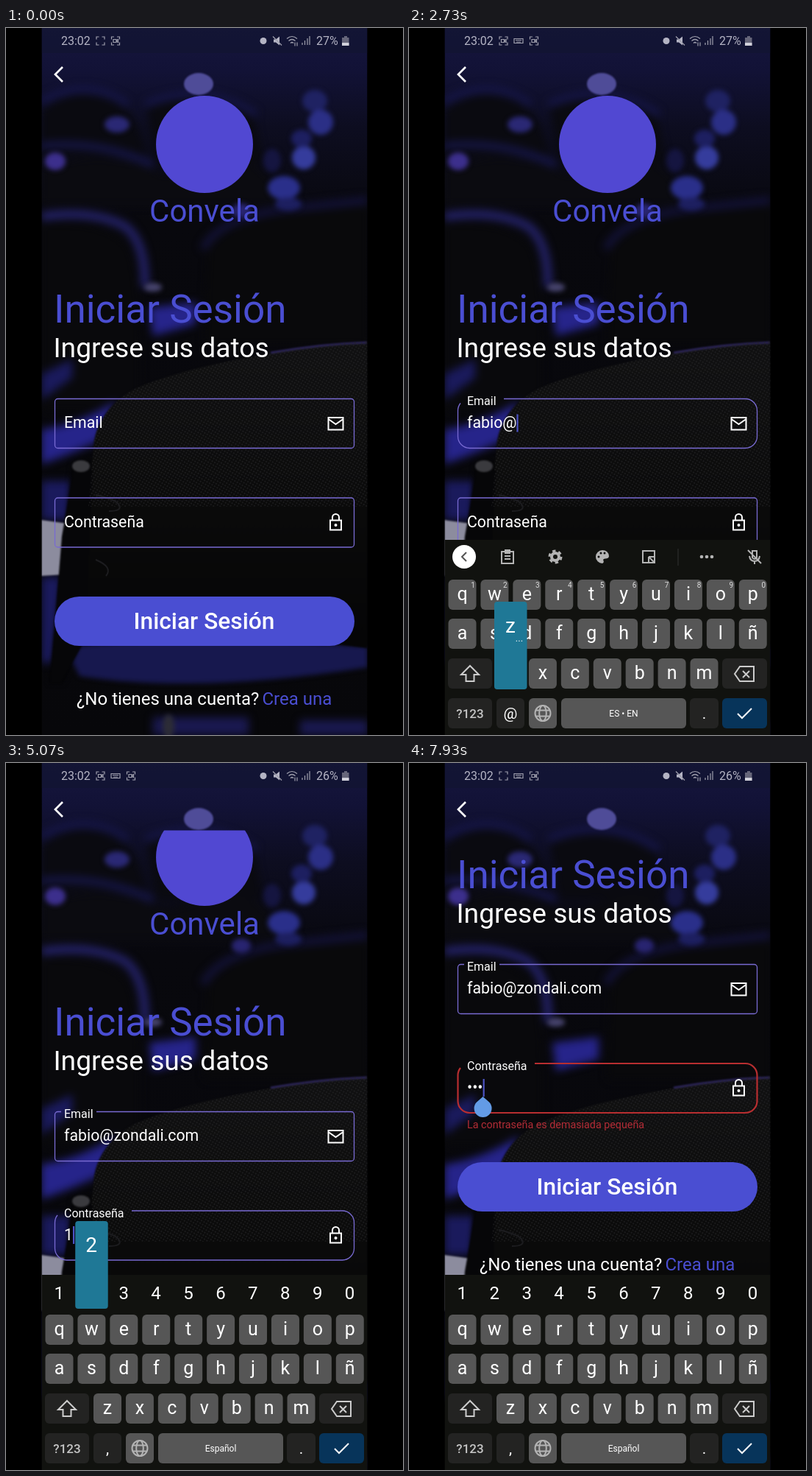
An HTML page for the animation above (8 s loop, 540 by 960 pixels).

```html
<!DOCTYPE html>
<html lang="es">
<head>
<meta charset="utf-8">
<style>
html, body { margin: 0; height: 100%; overflow: hidden; background: #000 }
svg { display: block; width: 540px; height: 960px; font-family: Roboto, sans-serif }
.mid { text-anchor: middle }
.line { fill: none; stroke: #fff; stroke-width: 2 }
.tool { fill: none; stroke: #b4b4b4; stroke-width: 2 }
.status { fill: none; stroke: #a0a0ae; stroke-width: 1.2 }
filter { color-interpolation-filters: sRGB }
</style>
</head>
<body>
<svg id="stage" viewBox="0 0 540 960"></svg>
<script>
const LOOP = 8000, BLUE = '#4a4ed2', MAIL = 'fabio@zondali.com', PASS = '123456';
const mailTimes = [1400, 1520, 1640, 2130, 2440, 2620, 2800, 2940, 3080, 3220, 3390, 3520, 3640, 3780, 3900, 4020, 4140];
const passTimes = [4950, 5120, 5300, 5480, 5660, 5830];
const deleteTimes = [7400, 7560, 7720];
const presses = [
  ...mailTimes.map((t, i) => [t, MAIL[i]]),
  ...passTimes.map((t, i) => [t, PASS[i]]),
  ...deleteTimes.map(t => [t, 'del'])
];
const FOCUS = 620, MAIL_KEYS = 1250, SWITCH = 4500;

const text = (x, y, size, str, attrs = 'fill="#fff"') => `<text x="${x}" y="${y}" font-size="${size}" ${attrs}>${str}</text>`;
const blob = (x, y, rx, ry, fill) => `<ellipse cx="${x}" cy="${y}" rx="${rx}" ry="${ry}" fill="${fill}"/>`;
const path = (d, attrs) => `<path d="${d}" ${attrs}/>`;
const at = (x, y, body, attrs = '') => `<g transform="translate(${x} ${y})" ${attrs}>${body}</g>`;

// Dim cinema seats
const backdrop = `
<rect x="48.5" width="443" height="960" fill="url(#room)"/>
<g filter="url(#soft6)">
  ${path('M48 112Q90 78 140 96Q180 110 190 175H48Z M190 100Q270 70 335 112L350 185H205Z', 'fill="#0a0a10"')}
  ${path('M48 100Q110 66 165 104M190 104Q270 72 340 118M48 160Q130 152 200 186', 'fill="none" stroke="#16164a" stroke-width="9"')}
  ${path('M48 190Q140 160 215 200L300 178Q360 180 372 240H48Z', 'fill="#0b0b10"')}
  ${path('M48 256Q120 246 163 270Q190 292 189 352', 'fill="none" stroke="#25236c" stroke-width="11"')}
  ${path('M48 266Q130 260 163 293Q180 320 182 420V520H48Z', 'fill="#09090c"')}
  ${path('M268 300Q290 258 380 246L492 234', 'fill="none" stroke="#131238" stroke-width="10"')}
  ${path('M275 305Q300 262 390 252L492 242V430H270Z', 'fill="#09090b"')}
  ${path('M48 545Q100 538 150 506L128 560Q80 582 48 592Z M195 380L258 372V402L200 418Z', 'fill="#26248a"')}
  ${path('M48 470L90 450V475L48 505Z M48 615H90V668H48Z M48 745H78V862H48Z', 'fill="#1a1a5c"')}
  ${path('M200 936H330V960H200Z M400 940H492V960H400Z', 'fill="#1a1950"')}
</g>
<g filter="url(#soft3)">
  ${blob(151, 131, 17, 11, '#2a2874')}${blob(67, 181, 14, 12, '#3c2f8c')}
  ${blob(420, 99, 17, 15, '#1f2262')}${blob(428, 128, 17, 17, '#2b2f86')}${blob(405, 176, 16, 16, '#353c9c')}
  ${blob(362, 180, 12, 16, '#151540')}${blob(378, 217, 22, 16, '#2a2f8a')}${blob(384, 239, 18, 9, '#1d1f60')}
  ${blob(320, 248, 13, 10, '#282470')}${blob(402, 150, 14, 12, '#1d1f60')}${blob(200, 352, 12, 6, '#46436c')}
  ${path('M80 840Q280 822 492 840V868Q260 905 100 880Z', 'fill="#17184e"')}
  ${path('M90 590L120 585L116 800L78 890H58Z', 'fill="#050507"')}
  ${blob(221, 948, 8, 16, '#2c2c36')}
</g>
<g filter="url(#soft1)">
  ${blob(262, 76, 20, 15, '#4f4c98')}
  ${path('M48 668L92 674L80 742L48 744Z', 'fill="#8c8c9e"')}
  ${path('M492 426Q430 428 330 447T175 490Q128 516 120 560L106 690V838Q300 815 492 842Z', 'fill="url(#cloth)"')}
  ${path('M491 427Q430 429 360 441', 'fill="none" stroke="#2c2558" stroke-width="3"')}
  ${path('M76 690L92 600H118L108 830L74 890H60Z', 'fill="#060608"')}
  ${blob(102, 595, 12, 8, '#3a3a3e')}
</g>
${path('M492 426Q430 428 330 447T175 490Q128 516 120 560L112 650H492Z', 'fill="url(#weave)"')}
${path('M122 634Q150 640 154 648T140 656M122 722Q146 732 136 744', 'fill="none" stroke="#1c1c1f" stroke-width="2"')}
<rect x="48.5" width="443" height="34" fill="#12152f" opacity=".6"/>`;

const corners = path('M-5.5-2V-5.5H-2M2-5.5H5.5V-2M5.5 2V5.5H2M-2 5.5H-5.5V2', 'class="status"');
const camera = path('M-3-2H1V2H-3ZM1 0L3.5-2V2Z', 'class="status"');
const statusBar = `
${text(75, 23, 16, '23:02', 'fill="#b4b4c4"')}
${at(128.5, 17.5, corners + `<g id="rec">${camera}</g>`)}
${at(149, 17.5, path('M-6-3H6V3H-6ZM-4-1H4M-3 1.5H3', 'class="status"'), 'id="kbIcon"')}
<g id="cam">${corners}${camera}</g>
${blob(350, 17.5, 4.5, 4.5, '#b4b4c4')}
${at(369, 17.5, path('M-5-2H-2L3-6V6L-2 2H-5Z', 'fill="#b4b4c4"') + path('M-6-6L6 6', 'class="status"'))}
${at(389, 17.5, path('M-7-3Q0-9 7-3M-4.5 0Q0-4 4.5 0M-2 3Q0 1 2 3M4 2V7M7 7V2', 'class="status"'))}
${path('M403 23V20M406.5 23V17M410 23V14M413 23V11', 'class="status"')}
<text id="battery" x="422" y="23" font-size="16" fill="#b4b4c4"></text>
<path d="M457 13H460V11H464V13H466.5V24H457Z" fill="#66667a"/><path d="M457 20H466.5V24H457Z" fill="#d0d0da"/>
${path('M77 53L67 63L77 73', 'class="line" style="stroke-width:2.7"')}`;

const field = (id, y, label, icon) => at(0, y, `
  <path id="${id}Box" fill="none"/>
  <text id="${id}Label" font-size="21.3" fill="#fff">${label}</text>
  <text id="${id}Text" x="79" y="39.5" font-size="21.3" fill="#fff"></text>
  <rect id="${id}Caret" y="21" width="2.2" height="24" fill="#4c53c4"/>
  <path id="${id}Under" stroke="#fff" stroke-width="1.3"/>
  ${icon}`);

const form = `<g clip-path="url(#view)"><g id="scroll">
  <circle cx="270" cy="158" r="66" fill="#5148d2"/>
  ${text(270, 263, 42, 'Convela', `class="mid" fill="${BLUE}"`)}
  ${text(65, 399.5, 53, 'Iniciar Sesión', `fill="${BLUE}"`)}
  ${text(64.5, 447, 37.2, 'Ingrese sus datos')}
  ${field('mail', 503.5, 'Email', path('M438.5 25.5H458.5V42H438.5ZM438.5 27.5L448.5 34.5L458.5 27.5', 'class="line"'))}
  ${field('pass', 638, 'Contraseña',
    path('M441 30.5H456V43.5H441ZM444 30V26.5A4.5 4.5 0 0 1 453 26.5V30', 'class="line"') + blob(448.5, 37, 2, 2, '#fff') +
    `<text id="error" x="79" y="88" font-size="14.3" fill="#b32c36">La contraseña es demasiada pequeña</text>
     <path id="handle" d="M0 0L8.5 7.5A12 12 0 1 1-8.5 7.5Z" fill="#639be6"/>`)}
  <rect x="66" y="772" width="408" height="67" rx="33.5" fill="${BLUE}"/>
  ${text(269.5, 816, 31.7, 'Iniciar Sesión', 'class="mid" fill="#fff" font-weight="500"')}
  ${text(96, 919, 24, '¿No tienes una cuenta?')}
  ${text(348.5, 919, 24, 'Crea una', `fill="${BLUE}"`)}
</g></g>`;

// Keyboard; centres are kept so pressed keys can be marked
const STEP = 43.92, keyPos = {};
const cap = (x, y, w, fill) => `<rect x="${x}" y="${y}" width="${w}" height="41" rx="6" fill="${fill}"/>`;
const row = (chars, x, y) => [...chars].map((c, i) => {
  const cx = x + i * STEP;
  keyPos[c] = [cx, y + 20];
  return cap(cx - 19, y, 38, '#565656') + text(cx, y + 28, 25, c, 'class="mid" fill="#fff"');
}).join('');
const numbers = [...'1234567890'].map((c, i) => {
  keyPos[c] = [72.3 + i * STEP, 719];
  return text(keyPos[c][0], 728, 24, c, 'class="mid" fill="#fff"');
}).join('');
const hints = [...'1234567890'].map((c, i) => text(87 + i * STEP, 760, 10, c, 'class="mid" fill="#ddd"')).join('');
const tools = `
${at(134, 718, path('M-8-7H8V9H-8ZM-3-9H3V-5H-3ZM-4-1H4M-4 3H4', 'class="tool"'))}
${at(199, 718, '<circle r="5" class="tool" style="stroke-width:4"/><circle r="8" class="tool" style="stroke-width:3" stroke-dasharray="4.4 3.978"/>')}
${at(263, 718, path('M0-9A9 9 0 0 0 0 9Q3 8 1 4Q2 2 5 2.500Q9 2 9-1Q8-9 0-9Z', 'fill="#b4b4b4"') + blob(-5, 0, 1.5, 1.5, '#111') + blob(-2, -5, 1.5, 1.5, '#111') + blob(3, -5, 1.5, 1.5, '#111'))}
${at(326, 718, path('M-8-8H8V8H2L-8 8ZM0 0H8M0 0V8M0 0L7 7', 'class="tool"'))}
${path('M366 707V730', 'stroke="#333" stroke-width="1"')}
${[398, 405, 412].map(x => blob(x, 718, 2.3, 2.3, '#b4b4b4')).join('')}`;
Object.assign(keyPos, { '@': [138, 930], '.': [401.5, 930], del: [456.5, 876] });

const keyboard = `<g id="keyboard">
  <rect x="48.5" y="695" width="443" height="265" fill="#11120f"/>
  <g id="numbers">${numbers}</g>
  <g id="bar">
    <circle cx="75" cy="718" r="16" fill="#fff"/><path id="chevron" fill="none" stroke="#555" stroke-width="2"/>
    <text id="suggest" class="mid" x="269" y="725" font-size="19" fill="#d0d0d0"></text>
    <g id="tools">${tools}</g>
    ${at(470, 718, path('M-3-8H3V1Q0 5-3 1ZM-7-1Q-6 6 0 6T7-1M0 6V10M-9-9L9 9', 'class="tool"'))}
  </g>
  ${row('qwertyuiop', 72.5, 749)}${row('asdfghjklñ', 72.5, 802)}${row('zxcvbnm', 138, 856)}
  <g id="hints">${hints}</g>
  ${cap(53, 856, 60, '#232322')}${cap(426, 856, 61, '#232322')}
  ${path('M83 866L95 878H88.500V887H77.500V878H71Z', 'class="tool" style="stroke:#ccc"')}
  ${path('M443 877L450 867H469V887H450ZM454 873L463 882M463 873L454 882', 'class="tool" style="stroke:#ccc"')}
  ${cap(53, 910, 60, '#232322')}${cap(119, 910, 38, '#232322')}${cap(163, 910, 38, '#565656')}
  ${cap(207, 910, 170, '#565656')}${cap(382, 910, 39, '#232322')}${cap(426, 910, 61, '#07345a')}
  ${text(83, 937, 17, '?123', 'class="mid" fill="#c4c4c4" font-weight="500"')}
  <text id="comma" class="mid" x="138" y="938" font-size="21" fill="#fff"></text>
  ${at(182, 930.5, '<circle r="10.5" class="tool"/><ellipse rx="4.800" ry="10.5" class="tool"/>' + path('M-10-4H10M-10 4H10', 'class="tool"'))}
  <text id="space" class="mid" x="292" y="935" font-size="12" fill="#fff"></text>
  ${text(401.5, 938, 21, '.', 'class="mid" fill="#fff"')}
  <path id="enter" class="line"/>
  <rect id="lit" width="38" height="41" rx="6" fill="#fff" opacity=".25"/>
  <g id="popup"><rect x="-22" y="-97" width="44.5" height="119" rx="4" fill="#1f7896"/>
    <text id="popChar" class="mid" y="-55" font-size="28" fill="#fff"></text>
    <text id="popDots" class="mid" x="12" y="-43" font-size="13" fill="#fff">...</text></g>
</g>`;

const blur = n => `<filter id="soft${n}" x="-20%" y="-20%" width="140%" height="140%"><feGaussianBlur stdDeviation="${n}"/></filter>`;
stage.innerHTML = `<defs>${blur(1)}${blur(3)}${blur(6)}
  <linearGradient id="room" x2="0" y2="1"><stop stop-color="#16163e"/><stop offset=".06" stop-color="#121236"/><stop offset=".14" stop-color="#0d0d20"/><stop offset=".27" stop-color="#08080d"/><stop offset="1" stop-color="#07070a"/></linearGradient>
  <linearGradient id="cloth" x2="0" y2="1"><stop stop-color="#111112"/><stop offset=".5" stop-color="#0b0b0b"/><stop offset="1" stop-color="#050506"/></linearGradient>
  <pattern id="weave" width="4" height="4" patternUnits="userSpaceOnUse" patternTransform="rotate(30)"><rect width="2" height="2" fill="#242426" opacity=".6"/></pattern>
  <clipPath id="view"><rect x="48.5" y="91.500" width="443" height="869"/></clipPath>
  <clipPath id="screen"><rect x="48.5" width="443" height="960"/></clipPath></defs>
  <g clip-path="url(#screen)">${backdrop}${statusBar}${form}${keyboard}</g>`;

const $ = id => document.getElementById(id);
const set = (id, attrs) => { for (const k in attrs) $(id).setAttribute(k, attrs[k]); };
const show = (id, on) => $(id).style.display = on ? '' : 'none';
const write = (id, str) => { if ($(id).textContent !== str) $(id).textContent = str; };
const mix = (a, b, p) => a + (b - a) * p;
const ramp = (t, start, ms) => Math.min(1, Math.max(0, (t - start) / ms));
const easeOut = p => 1 - (1 - p) ** 2;

// Rounded box whose top edge leaves room for the floating label
function outline(r, gapL, gapR) {
  const L = 66.5, R = 473.5, B = 67, dx = r - (gapL - L), arc = `A${r} ${r} 0 0 1 `;
  const end = dx > 0 ? `${arc}${gapL} ${r - Math.sqrt(r * r - dx * dx)}` : `${arc}${L + r} 0H${gapL}`;
  return `M${gapR} 0H${R - r}${arc}${R} ${r}V${B - r}${arc}${R - r} ${B}H${L + r}${arc}${L} ${B - r}V${r}${end}`;
}

function drawField(id, labelW, str, raised, focus, caret, error = 0) {
  const gapL = mix(75, 70, focus), gapR = mix(gapL, 79 + labelW + mix(5, 11, focus), raised);
  set(id + 'Box', {
    d: outline(mix(4, 16, focus), gapL, gapR),
    stroke: `rgb(${mix(120, 184, error)},${mix(106, 46, error)},${mix(210, 48, error)})`,
    'stroke-width': mix(1.3, 2.2, error)
  });
  set(id + 'Label', { transform: `translate(79 ${mix(39.5, 8.5, raised)}) scale(${mix(1, .75, raised)})` });
  write(id + 'Text', str);
  const end = 79 + (str ? $(id + 'Text').getComputedTextLength() : 0);
  set(id + 'Caret', { x: end, opacity: caret });
  return end;
}

function draw(t) {
  const typed = times => times.filter(x => x <= t).length;
  const mail = MAIL.slice(0, typed(mailTimes));
  const shown = typed(passTimes) - typed(deleteTimes);
  const sinceDigit = t - passTimes[Math.max(0, typed(passTimes) - 1)];
  const plainLast = shown > 0 && t < deleteTimes[0] && sinceDigit < 1500;
  const pass = '•'.repeat(plainLast ? shown - 1 : shown) + (plainLast ? PASS[shown - 1] : '');

  const onMail = ramp(t, FOCUS, 200), onPass = ramp(t, SWITCH, 200);
  const lastEvent = Math.max(...[FOCUS, SWITCH, ...presses.map(p => p[0])].filter(x => x <= t), 0);
  const idle = t - lastEvent;
  const caret = idle < 250 ? 1 : ramp(.5 + .8 * Math.cos(idle * Math.PI / 500), 0, 1);

  set('scroll', { transform: `translate(0 ${-30 * easeOut(ramp(t, 4550, 200)) - 200 * easeOut(ramp(t, 5980, 437))})` });
  const mailEnd = drawField('mail', 39, mail, onMail, onMail * (1 - onPass), t > FOCUS && t < SWITCH ? caret : 0);
  const bad = ramp(t, 7420, 200);
  const passEnd = drawField('pass', 81, pass, onPass, onPass, t > SWITCH ? caret : 0, bad);
  const composing = mail && t < mailTimes[5];
  set('mailUnder', { d: composing ? `M79 42.500H${mailEnd}` : '' });
  set('error', { opacity: bad });
  set('handle', { transform: `translate(${passEnd} 45)` });
  show('handle', t > 6800);

  const mailMode = t >= MAIL_KEYS && t < SWITCH;
  write('battery', t < SWITCH ? '27%' : '26%');
  show('rec', t % 2000 > 500 && t % 2000 < 1300);
  show('kbIcon', t >= MAIL_KEYS);
  set('cam', { transform: `translate(${t < MAIL_KEYS ? 149 : 170} 17.5)` });

  set('keyboard', { transform: `translate(0 ${265 * (1 - easeOut(ramp(t, 600, 250)))})` });
  show('keyboard', t > 600);
  show('numbers', !mailMode);
  show('bar', mailMode);
  show('hints', mailMode);
  show('tools', !composing);
  write('suggest', composing ? mail : '');
  set('chevron', { d: composing ? 'M72 712L78 718L72 724' : 'M78 712L72 718L78 724' });
  write('comma', mailMode ? '@' : ',');
  write('space', mailMode ? 'ES • EN' : 'Español');
  set('enter', { d: t < MAIL_KEYS ? 'M466 926V932H448M453 927L448 932L453 937' : 'M447 931L453 937L466 924' });

  const press = presses.find(([x]) => t >= x - 80 && t < x + 10);
  const key = press && press[1], bubble = key && /^\w$/.test(key);
  show('popup', bubble);
  show('lit', key && !bubble);
  if (!key) return;
  const [x, y] = keyPos[key];
  if (bubble) {
    set('popup', { transform: `translate(${x} ${y})` });
    write('popChar', key);
    show('popDots', /[a-z]/.test(key));
  } else {
    const w = key === 'del' ? 61 : 38;
    set('lit', { x: x - w / 2, y: y - 20, width: w });
  }
}

function frame() {
  draw(performance.now() % LOOP);
  requestAnimationFrame(frame);
}
frame();
</script>
</body>
</html>
```
